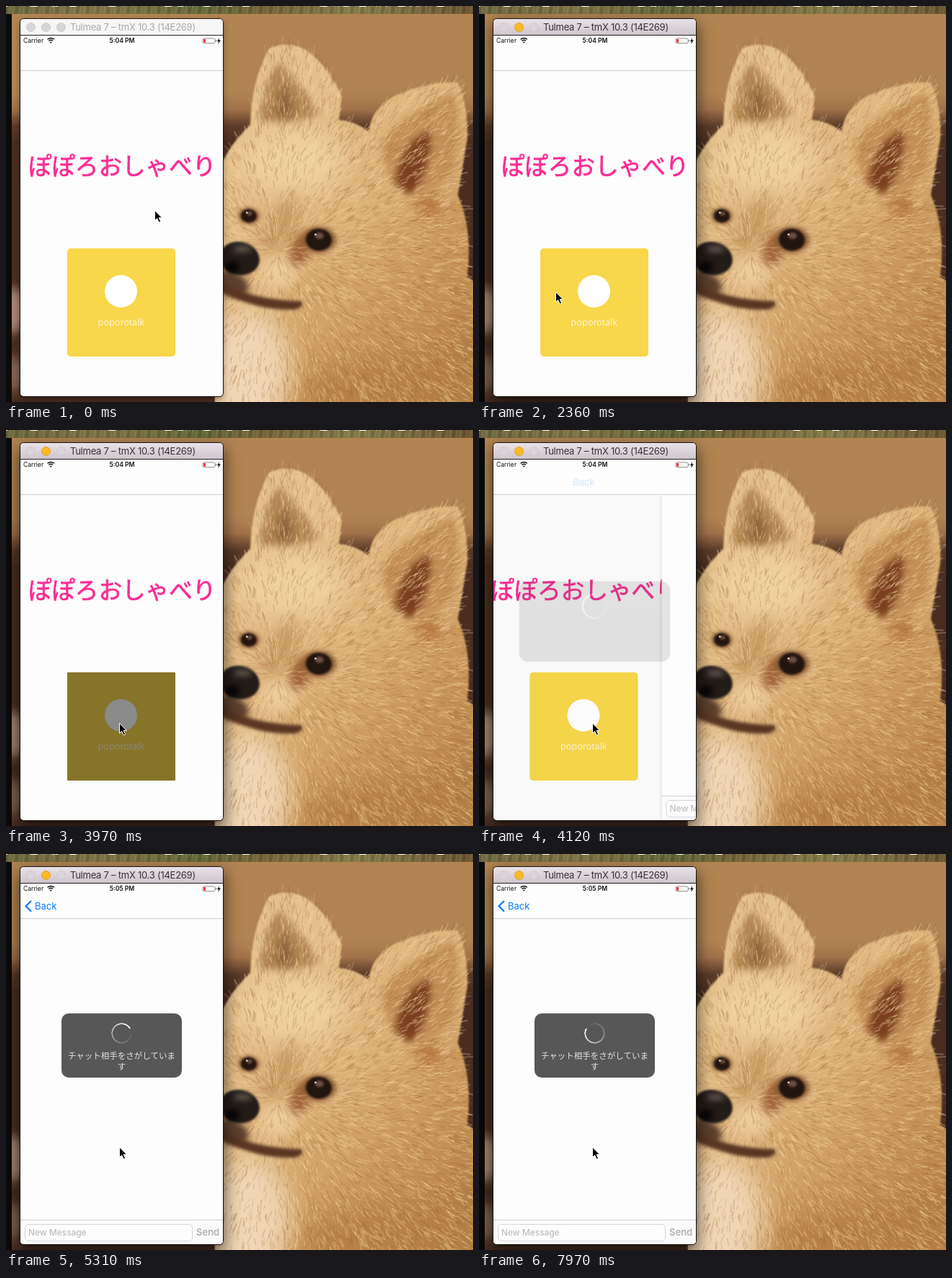
Write an HTML page with a canvas that moves like this. It is 648 px wide and 549 px high and loops after 8000 ms.

```html
<!DOCTYPE html>
<html lang="ja">
<head>
<meta charset="utf-8">
<title>Chat demo</title>
<style>
html, body { margin: 0; width: 100%; height: 100%; overflow: hidden; background: #0a0a0a; }
body { font-family: Inter, "Noto Sans CJK JP", sans-serif; }
div, canvas, svg, span { position: absolute; white-space: nowrap; }
canvas { left: 0; top: 0; }
#bar { left: 0; top: 0; width: 648px; height: 10.5px; overflow: hidden;
  background: linear-gradient(90deg, #6d6a40aa, #8a784daa 20%, #5f6a38aa 42%, #796038aa 55%, #8c824eaa 75%, #6b4c30aa),
    repeating-linear-gradient(97deg, #4b4629 0 3px, #8d8258 5px, #5c6a35 8px, #a08a62 11px, #4b4629 14px); }
#folders { left: -9px; top: -10px; display: flex; gap: 13px; color: #fff;
  font: 500 12px/12px Inter, "Noto Sans CJK JP", sans-serif; }
#folders b { font-weight: 500; display: flex; gap: 5px; }
#folders i { width: 10px; height: 9px; border: 1.5px solid #fff; border-radius: 2px; }
#win, #shade { left: 20px; top: 18px; width: 281px; height: 523px; border-radius: 5px; }
#win { overflow: hidden; background: #fdfdfd; }
#top { width: 282px; height: 22px; border-bottom: 1px solid #222; background: #f6f6f6; color: #a9a9a9; }
.on #top { background: linear-gradient(#e9e1e8, #cec5cd); color: #333; }
#top i { position: relative; float: left; left: 8px; top: 5px; margin-right: 8px; width: 11px; height: 11px;
  border: .5px solid #cbc7ca; border-radius: 50%; background: #d8d5d7; }
.on #top i:nth-child(2) { background: #fdb924; border-color: #dfa023; }
#top span { left: 69px; top: 3px; font: 13px/17px Inter, sans-serif; letter-spacing: -.25px; }
.status { left: 4px; top: 24px; font: 8.6px/13px Inter, sans-serif; color: #111; }
#clock { left: 0; width: 282px; text-align: center; font-weight: 600; }
#view { top: 72px; width: 282px; height: 451px; overflow: hidden; }
#home, #chat, #dim { width: 282px; height: 451px; background: #fdfdfd; }
#home #dim { background: #000; }
#chat { box-shadow: 0 0 5px #0004; }
#name { left: 0; top: 106px; width: 282px; text-align: center; color: #fd2b93; -webkit-text-stroke: .7px #fd2b93;
  font: 32.6px/48px "Noto Sans CJK JP", sans-serif; }
#btn { left: 65px; top: 245.5px; width: 150px; height: 150px; border-radius: 5px; background: #f8d74a; color: #fff; }
#btn i { position: absolute; left: 52px; top: 37px; width: 45px; height: 45px; border-radius: 50%; background: #fff; }
#btn span { left: 0; width: 150px; top: 94px; text-align: center; font: 300 12.5px/17px Inter, sans-serif; letter-spacing: .3px; }
#nav { top: 71px; width: 282px; height: 1px; background: #cfcfd2; }
#back { left: 20px; top: 46px; font: 13px/17px Inter, sans-serif; color: #0b7bfe; }
#input { left: 0; top: 417px; width: 282px; height: 34px; border-top: 1px solid #cfcfd2; background: #fbfbfb; }
#input div { left: 6px; top: 5px; width: 231px; height: 22px; border: 1px solid #d6d6da; border-radius: 5px; background: #fdfdfd;
  font: 12px/22px Inter, sans-serif; text-indent: 4px; color: #b4b4b8; }
#input span { left: 244px; top: 7px; font: 600 13px/18px Inter, sans-serif; color: #b1b1b5; }
#hud { left: 57px; top: 203px; width: 167px; height: 89px; border-radius: 10px; background: #575757; }
#ring { left: 69px; top: 13px; width: 29px; height: 29px; border-radius: 50%;
  mask: radial-gradient(circle, #0000 12px, #000 12.6px 13.9px, #0000 14.5px); }
#wait { left: 0; top: 51px; width: 167px; text-align: center; color: #e4e4e4;
  font: 11.5px/15px "Noto Sans CJK JP", sans-serif; }
</style>
</head>
<body>
<canvas id="photo" width="648" height="549"></canvas>
<div id="bar"><div id="folders"></div></div>
<div id="shade"></div>
<div id="win">
  <div id="top"><i></i><i></i><i></i><span>Tulmea 7 – tmX 10.3 (14E269)</span></div>
  <span class="status">Carrier</span>
  <span class="status" id="clock"></span>
  <svg width="282" height="20" style="left:0;top:22px" fill="none" stroke="#111">
    <path d="M37.5 6.3q4.700-3.600 9.400 0M39.300 8.300q2.900-2.200 5.800 0" stroke-width="1.400"/>
    <path d="M40.500 9.700h3.400l-1.700 2z" fill="#111" stroke="none"/>
    <rect x="253" y="5" width="17" height="6.500" rx="1.500" stroke="#777" stroke-width=".8"/>
    <path d="M254 6h3v4.500h-3z" fill="#f33" stroke="none"/>
    <path d="M271.500 7v2.500" stroke="#777"/>
    <path d="M276 4l-3 5h2l-1 4 4-5.500h-2.500z" fill="#111" stroke="none"/>
  </svg>
  <div id="view">
    <div id="home">
      <div id="name">ぽぽろおしゃべり</div>
      <div id="btn"><i></i><span>poporotalk</span></div>
      <div id="dim"></div>
    </div>
    <div id="chat">
      <div id="input"><div>New Message</div><span>Send</span></div>
    </div>
  </div>
  <div id="nav"></div>
  <svg id="chevron" width="14" height="20" style="left:4px;top:44px"><path d="M11 3L3.500 10.300 11 17.600" fill="none" stroke="#0b7bfe" stroke-width="2.200"/></svg>
  <span id="back">Back</span>
  <div id="hud"><div id="ring"></div><div id="wait">チャット相手をさがしていま<br>す</div></div>
</div>
<svg id="cursor" width="16" height="22" style="left:-1px;top:-1px">
  <path d="M1.500 1.500v14l3.200-2.900 2.400 5.400 2.500-1.100-2.400-5.200h4.300z" fill="#000" stroke="#fff"/>
</svg>
<script>
const $ = id => document.getElementById(id);

$('folders').innerHTML = 'ト 楽器 web とレイン 音楽 料理 Tulmeaアプリ 辞桂 株式 英国 アバ'
  .split(' ').map(s => `<b><i></i>${s}</b>`).join('');

const g = $('photo').getContext('2d');
let seed = 7;
const rand = () => (seed = seed * 16807 % 2147483647) / 2147483647;

function soft(color, blur, path) {
  g.filter = blur ? `blur(${blur}px)` : 'none';
  g.fillStyle = color;
  g.fill(typeof path === 'string' ? new Path2D(path) : path);
}
function oval(color, blur, x, y, rx, ry, turn = 0) {
  const p = new Path2D();
  p.ellipse(x, y, rx, ry, turn, 0, 7);
  soft(color, blur, p);
}
function ramp(x, y, u, v, ...stops) {
  const r = g.createLinearGradient(x, y, u, v);
  stops.forEach((c, i) => r.addColorStop(i / (stops.length - 1), c));
  return r;
}

function drawPhoto() {
  g.fillStyle = ramp(0, 120, 0, 190, '#b18452', '#a0714a', '#5b3a28', '#4a2d20');
  g.fillRect(0, 0, 648, 549);
  oval('#a68270', 7, 8, 422, 20, 32);
  oval('#80604f', 7, 8, 510, 18, 25);

  const dog = new Path2D('M290 240Q306 195 339 165Q340 105 365 59Q388 48 413 59Q446 80 466 126L462 158' +
    'Q486 160 503 174Q508 142 540 124Q590 103 627 106Q642 140 640 185L627 262Q648 310 640 375L670 400V570H290Z');
  soft(ramp(340, 200, 640, 500, '#e5c08b', '#deb47b', '#cb995d', '#b37e45'), 1, dog);
  g.save();
  g.clip(dog);
  oval('#efd09d', 16, 400, 215, 70, 45);
  oval('#f0d5b6', 18, 335, 510, 60, 90);
  oval('#b58146', 18, 540, 535, 130, 40);
  // ears
  soft('#b58a57', 5, 'M350 160Q356 105 378 78Q410 105 434 152L395 160Z');
  soft('#93683f', 6, 'M372 155Q374 120 388 108Q402 135 400 155Z');
  soft('#c4915a', 5, 'M520 190Q560 140 622 120Q634 180 618 235Q575 275 530 240Z');
  soft('#7a3f1f', 5, 'M540 248Q545 190 588 172Q592 225 562 262Z');
  oval('#b77b42', 8, 587, 280, 17, 20);
  // bridge of the nose and muzzle
  oval('#c79a62', 9, 380, 305, 17, 45, .5);
  oval('#ecca9a', 9, 378, 370, 28, 22);
  oval('#a2683a', 6, 408, 338, 14, 24, .2);
  g.restore();

  // fur combed outwards from the muzzle, overhanging the outline
  g.filter = 'none';
  for (let i = 0; i < 6000; i++) {
    const x = 300 + rand() * 348, y = 50 + rand() * 499;
    if (!g.isPointInPath(dog, x, y)) continue;
    const a = Math.atan2(y - 340, x - 375) + (rand() - .5) * .8, r = 5 + rand() * 11;
    g.strokeStyle = rand() < .58 ? '#f4d9a955' : '#9560303a';
    g.lineWidth = .7 + rand() * 1.2;
    g.beginPath();
    g.moveTo(x, y);
    g.lineTo(x + r * Math.cos(a), y + r * Math.sin(a));
    g.stroke();
  }

  for (const [x, y, r] of [[337, 291, 11], [434, 324, 18]]) {
    oval('#8a5a35', 3, x, y, r * 1.35, r);
    oval('#22150f', 1.5, x, y, r, r * .85, .1);
    oval('#6e5140', 1.5, x + 1, y - r * .3, r / 3, r / 4);
    oval('#d7c3b0', .6, x - r / 4, y - r * .4, 1.5, 1.5);
  }
  oval('#5c3f2c', 4, 312, 385, 26, 17, .4);
  soft('#5a3623', 2, 'M300 384Q345 408 410 409Q415 417 400 421Q345 422 300 396Z');
  oval('#221b18', 1.5, 324, 350, 28, 23, .2);
  oval('#6d6058', 4, 328, 337, 13, 4);
  oval('#080606', 3, 314, 362, 10, 8);
  g.filter = 'none';
  g.fillStyle = '#0a0a0a';
  g.fillRect(0, 0, 8, 549);
}
drawPhoto();

// Pointer strokes: first and last tick, where it ends, sideways bow
const moves = [[3, 6, 246, 277, -10], [7, 10, 331, 190, 0], [10, 15, 106, 396, 0], [15, 18, 203, 388, -28], [18, 21, 157, 406, 24]];

function pointer(n) {
  let x = 206, y = 283;
  for (const [from, to, u, v, bow] of moves) {
    const k = Math.max(0, Math.min(1, (n - from) / (to - from)));
    const e = k * k * (3 - 2 * k);
    x += (u - x) * e;
    y += (v - y) * e + bow * Math.sin(Math.PI * e);
  }
  return `translate(${x}px,${y}px)`;
}

const PRESS = 3970, TICK1 = 147.3, TICK2 = 148.1;

function render(t) {
  // the screen refreshes in ticks
  const early = t < PRESS;
  const n = early ? Math.floor((t - 140) / TICK1) : 26 + Math.floor((t - PRESS) / TICK2);
  const q = early ? 140 + n * TICK1 : PRESS + (n - 26) * TICK2;
  const on = t >= 140, pressed = n === 26;

  document.body.className = on ? 'on' : '';
  $('shade').style.boxShadow = (on ? '0 9px 22px 2px #0009' : '0 4px 10px #0006') + ', 0 0 0 1px #1a1412';
  $('clock').textContent = q < 4700 ? '5:04 PM' : '5:05 PM';
  $('cursor').style.transform = pointer(n);
  $('btn').style.filter = pressed ? 'brightness(.54)' : 'none';
  $('btn').style.borderRadius = pressed ? '1px' : '5px';

  // push to the chat page, critically damped
  const w = Math.max(0, q - 4070) * .0155;
  const p = n < 27 ? 0 : 1 - (1 + w) * Math.exp(-w);
  $('home').style.transform = `translateX(${-84.6 * p}px)`;
  $('dim').style.opacity = .1 * p;
  $('chat').style.transform = `translateX(${282 * (1 - p)}px)`;
  $('chat').style.visibility = p ? 'visible' : 'hidden';
  $('back').style.transform = `translateX(${109 * (1 - p)}px)`;
  $('back').style.opacity = p;
  $('chevron').style.opacity = p ** 6;

  const h = n < 27 ? 0 : 1 - Math.exp(-(q - 4110) / 50);
  $('hud').style.opacity = h;
  $('hud').style.transform = `scale(${1.3 - .3 * h})`;
  $('wait').style.opacity = p ** 3;
  const turn = 60 + (q - 5303) * .36;
  $('ring').style.background = `conic-gradient(from ${turn}deg, #fff0, #fff4 40%, #fff)`;
}

const start = performance.now();
function loop() {
  render((performance.now() - start) % 8000);
  requestAnimationFrame(loop);
}
loop();
</script>
</body>
</html>
```
